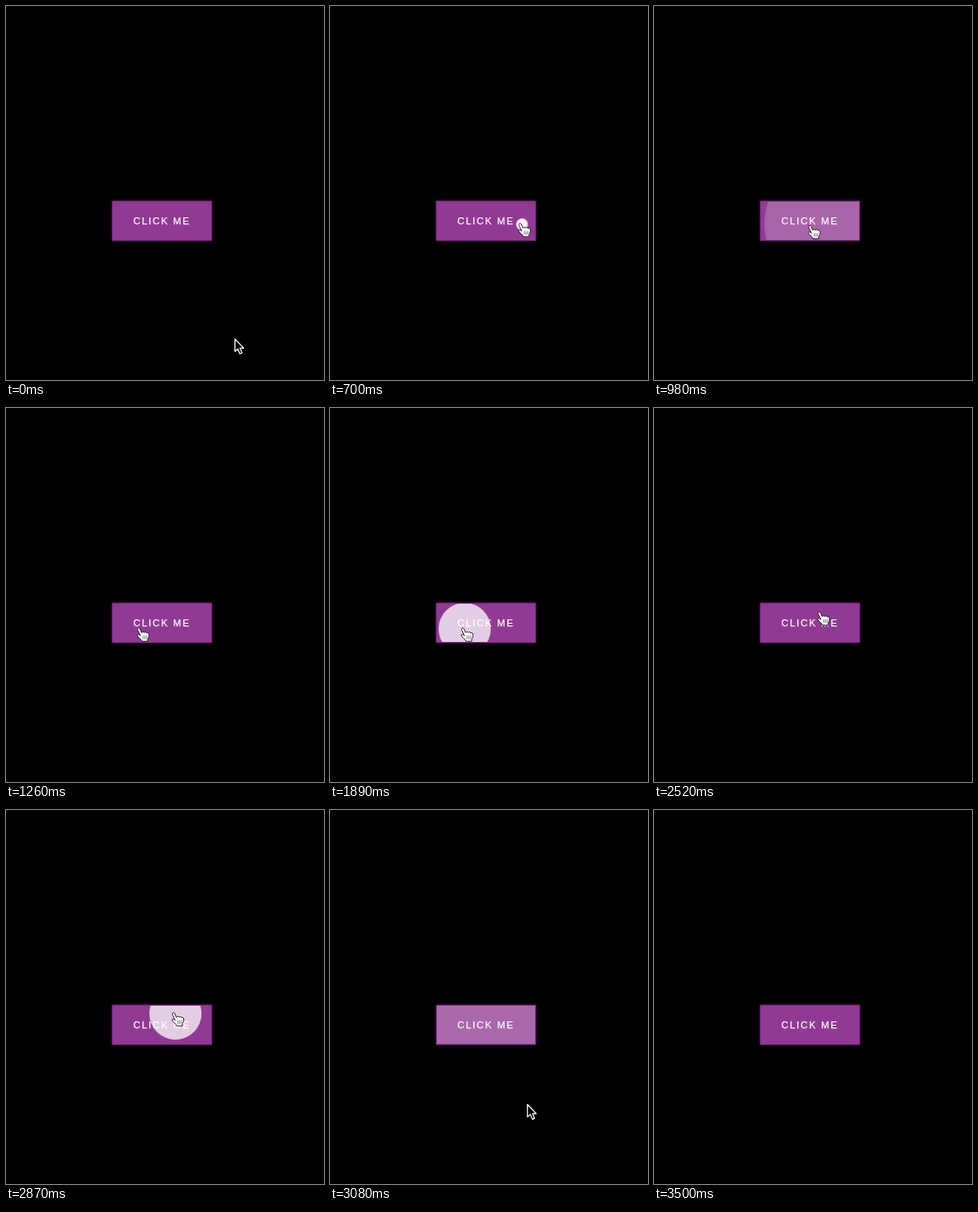
These frames come from a looping animation (366 by 430 pixels, 3780 ms). An HTML page:

```html
<!DOCTYPE html>
<html lang="en">
<head>
<meta charset="utf-8">
<title>Ripple button</title>
<style>
  html, body { margin: 0; width: 100%; height: 100%; overflow: hidden; background: #000; }
  .stage { position: relative; width: 366px; height: 430px; overflow: hidden; background: #000; }
  .button {
    position: absolute; left: 121.6px; top: 223.8px; width: 115.4px; height: 46.4px;
    box-sizing: border-box; overflow: hidden;
    border: .8px solid #7c2580; background: #913a93;
    box-shadow: 0 0 3px rgba(145, 58, 147, .6);
    color: #fff; font: 11.2px/44.8px "Liberation Sans", Arial, sans-serif;
    letter-spacing: 1.6px; padding-left: 24px; white-space: nowrap;
    -webkit-text-stroke: .25px #fff;
  }
  .ripple {
    position: absolute; width: 80px; height: 80px; margin: -40px 0 0 -40px;
    border-radius: 50%; background: #fff;
    animation: ripple 500ms ease-out both paused;
  }
  @keyframes ripple {
    from { transform: scale(0); opacity: 1; }
    to { transform: scale(3); opacity: 0; }
  }
  svg { position: absolute; left: 0; top: 0; }
</style>
</head>
<body>
<div class="stage">
  <div class="button">CLICK ME<span class="ripple" id="ripple"></span></div>
  <svg width="366" height="430" viewBox="0 0 366 430" fill="none">
    <g id="ring" opacity="0">
      <circle r="30" stroke="#000" stroke-opacity=".5" stroke-width="4"/>
      <circle r="32.3" stroke="#fff" stroke-opacity=".3"/>
    </g>
    <g id="cursor" stroke-linejoin="round" stroke-linecap="round">
      <path id="arrow" fill="#000" stroke="#fff" stroke-width="1.2"
        d="M.5 .8V15.2L3.8 12.2L6.2 17.9L8.7 16.8L6.3 11.4H10.6Z"/>
      <g id="hand" stroke="#1c0a1d" stroke-width=".9">
        <path fill="#fff"
          d="M-3.5 1C-4.2 -1 -1.8 -2 -.9 -.2L1.2 4.4C1.8 2.9 3.8 3 4.2 4.3C5 3 6.8 3.3 7 4.8
             C8 3.9 9.4 4.5 9.5 6C9.8 8 9.2 10 8.2 11.6L8 14.2H1.4L.8 12.6
             C-.8 11.4 -2.4 9.8 -3.7 8C-4.4 6.8 -3 5.8 -1.8 6.6L-.6 7.6Z"/>
        <path stroke-width=".7" stroke-opacity=".75" d="M2.8 8V11.5M4.8 8V11.5M6.8 8V11.5"/>
      </g>
    </g>
  </svg>
</div>
<script>
  const LOOP = 3780, STEP = 70;
  const BOX = { left: 121.6, top: 223.8, right: 237, bottom: 270.2 };

  // time, x, y of the pointer
  const path = [
    [0, 263, 382], [70, 240, 318], [140, 202, 256], [210, 175, 233], [280, 221, 251],
    [700, 221, 251], [1190, 156, 255], [1260, 155, 254], [1960, 155, 254],
    [2170, 160, 254.5], [2590, 195, 234], [2870, 195, 234],
    [3220, 244, 394], [3500, 248, 432], [LOOP, 248, 432]
  ];
  const clicks = [
    { x: 221, y: 251, down: 420, up: 683 },
    { x: 155, y: 254, down: 1610, up: 1810 },
    { x: 195, y: 234, down: 2730, up: 2790 }
  ];

  const $ = id => document.getElementById(id);
  const ripple = $('ripple'), ring = $('ring'), cursor = $('cursor');
  const wave = ripple.getAnimations()[0];
  const smooth = p => p * p * (3 - 2 * p);
  const move = (el, x, y) => el.setAttribute('transform', `translate(${x} ${y})`);
  const show = (el, on) => el.setAttribute('visibility', on ? 'visible' : 'hidden');

  function pointAt(t) {
    const i = path.findIndex(p => p[0] > t);
    const [t0, x0, y0] = path[i - 1], [t1, x1, y1] = path[i];
    const p = smooth((t - t0) / (t1 - t0));
    return [x0 + (x1 - x0) * p, y0 + (y1 - y0) * p];
  }

  function draw(t) {
    const [x, y] = pointAt(t);
    const over = x > BOX.left && x < BOX.right && y > BOX.top && y < BOX.bottom;
    move(cursor, x, y);
    show($('hand'), over);
    show($('arrow'), !over);

    const pressed = clicks.find(c => t >= c.down && t < c.up);
    ring.setAttribute('opacity', pressed ? Math.min(1, (t - pressed.down + STEP) / (3 * STEP)) : 0);
    if (pressed) move(ring, pressed.x, pressed.y);

    const last = clicks.filter(c => t >= c.up).pop();
    wave.currentTime = last ? Math.min(t - last.up, 500) : 0;
    if (last) {
      ripple.style.left = last.x - BOX.left - .8 + 'px';
      ripple.style.top = last.y - BOX.top - .8 + 'px';
    }
  }

  let start;
  function tick(now) {
    start ??= now;
    draw(Math.floor((now - start) % LOOP / STEP) * STEP);
    requestAnimationFrame(tick);
  }
  draw(0);
  requestAnimationFrame(tick);
</script>
</body>
</html>
```
